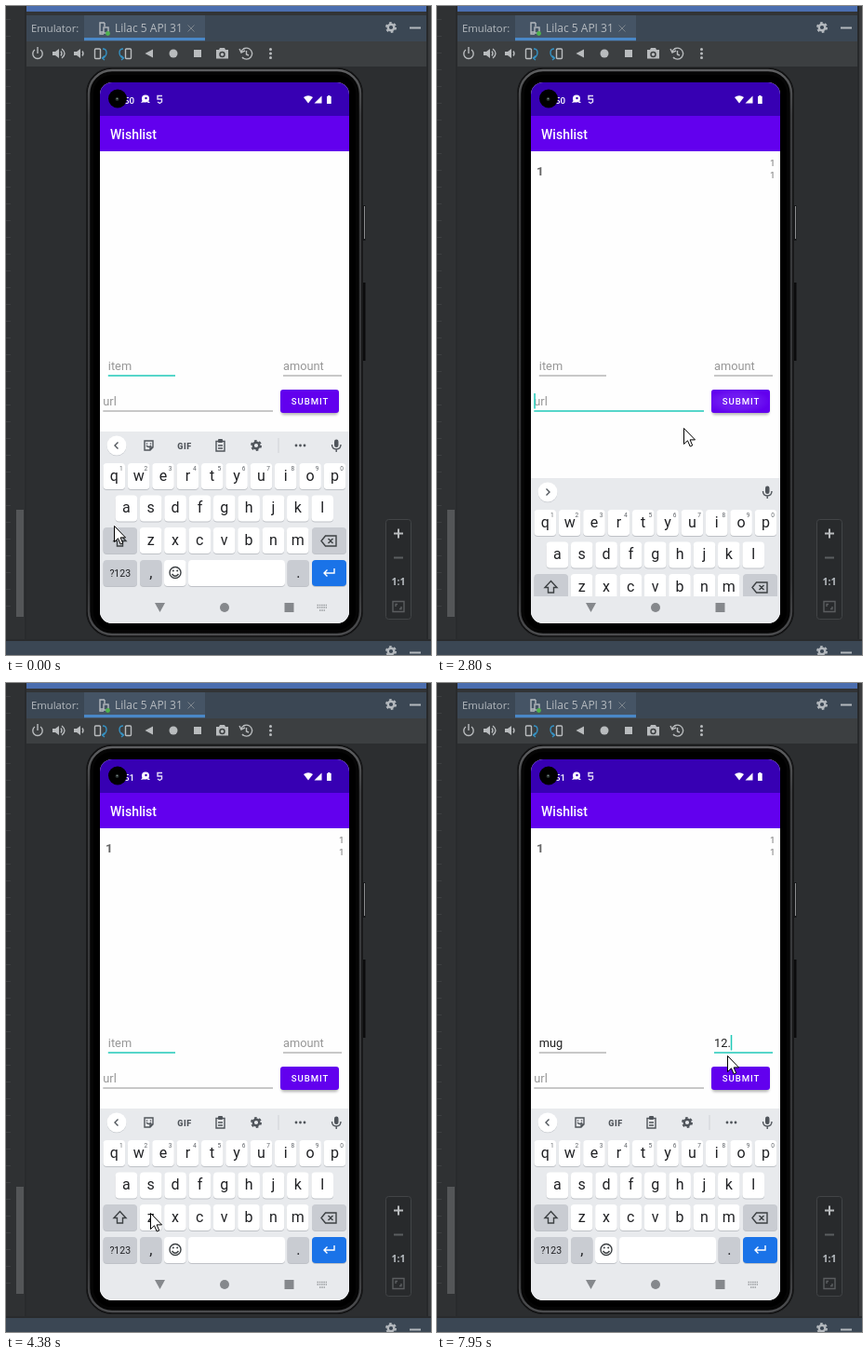
An HTML page for the animation above (8000 ms loop, 457x697 px).

```html
<!DOCTYPE html>
<html lang="en">
<head>
<meta charset="utf-8">
<title>Wishlist emulator</title>
<style>
html, body { margin: 0; width: 100%; height: 100%; overflow: hidden; background: #2f3133; }
svg { display: block; width: 457px; height: 697px; }
text { font-family: Roboto, sans-serif; white-space: pre; }
.ide { font-family: "Open Sans", sans-serif; fill: #b6bbc0; }
.mid { text-anchor: middle; }
.key { font-size: 16px; fill: #202124; }
.alt { font-size: 6.5px; fill: #5f6368; }
.field text { font-size: 12.8px; fill: #212121; }
.field .hint { fill: #979797; }
.line { fill: none; stroke: currentColor; stroke-width: 1.4; }
</style>
</head>
<body>
<svg viewBox="0 0 457 697">
  <defs>
    <clipPath id="screen"><rect x="101" y="82" width="268" height="581" rx="13"/></clipPath>
    <clipPath id="keyClip"><rect x="101" y="82" width="268" height="552"/></clipPath>
    <radialGradient id="glow" cx=".45" cy=".5" r=".55">
      <stop offset="0" stop-color="#8f4cf8"/><stop offset=".6" stop-color="#803bf5"/>
      <stop offset="1" stop-color="#6200ee"/>
    </radialGradient>
    <linearGradient id="rim" x2="0" y2="1">
      <stop offset="0" stop-color="#5d5e60"/><stop offset=".08" stop-color="#3b3c3e"/>
      <stop offset=".9" stop-color="#323335"/><stop offset="1" stop-color="#4b4c4e"/>
    </linearGradient>
    <filter id="soft" x="-20%" y="-40%" width="140%" height="200%"><feGaussianBlur stdDeviation="1.4"/></filter>
    <g id="gear" fill="none" stroke="currentColor">
      <circle r="3.3" stroke-width="2.4"/>
      <circle r="5" stroke-width="2" stroke-dasharray="2.6 2.636"/>
    </g>
    <g id="speaker">
      <path d="M-6-2H-3L1-5V5L-3 2H-6Z" fill="currentColor"/>
      <path d="M3-2.5Q5 0 3 2.5" class="line"/>
    </g>
    <g id="turn">
      <rect x="-6.5" y="-5" width="6" height="10.5" rx="1" class="line"/>
      <path d="M2-5Q6-5 6-1T2 5M4 2.5L1.5 5L4 7" class="line" style="color:#3592c4"/>
    </g>
  </defs>

  <!-- IDE window -->
  <rect width="457" height="697" fill="#2f3133"/>
  <path d="M2.5 14V655" stroke="#3d3f41" stroke-width="5" stroke-dasharray="1 17"/>
  <rect x="11" y="541" width="8" height="115" fill="#545658"/>
  <rect x="20" width="2" height="681" fill="#292b2d"/>
  <rect x="22" width="431" height="6" fill="#4b6eaf"/>
  <rect x="22" y="6" width="431" height="4" fill="#323436"/>
  <rect x="22" y="10" width="431" height="28" fill="#3b4754"/>
  <rect x="84" y="10" width="130" height="28" fill="#455465"/>
  <rect x="84" y="34" width="130" height="3" fill="#4a88c7"/>
  <rect x="22" y="38" width="431" height="27" fill="#3c3f41"/>
  <rect x="22" y="65" width="431" height="616" fill="#2c2e30"/>
  <rect x="453" width="4" height="681" fill="#393b3d"/>
  <rect x="452" width="2" height="681" fill="#27292b"/>
  <rect y="681" width="457" height="16" fill="#3b4754"/>
  <rect y="680" width="457" height="2" fill="#292b2d"/>
  <text class="ide" x="27" y="28" font-size="11.3">Emulator:</text>
  <text class="ide" x="117" y="28" font-size="12">Lilac 5 API 31</text>
  <g color="#b4b9be">
    <path d="M106 18H101V30H105M101 28H105M106 18V22" class="line"/>
    <rect x="105" y="23" width="5" height="6" class="line"/>
    <circle cx="109.5" cy="29.5" r="2.4" fill="#4fb34d"/>
    <path d="M195.500 20.500L202.500 27.500M202.500 20.500L195.500 27.500" stroke="#7d858d"/>
    <use href="#gear" x="414" y="23"/><use href="#gear" x="414" y="693"/>
    <path d="M434 23.500H446M434 694.500H446" stroke="currentColor" stroke-width="2"/>
  </g>
  <g transform="translate(0 51)" color="#b9bcbe" fill="#b9bcbe">
    <path d="M31-4A5.200 5.200 0 1 0 37-4M34-7V0" class="line" stroke-width="2"/>
    <use href="#speaker" x="56"/><path d="M60-5Q66 0 60 5" class="line"/>
    <use href="#speaker" x="79"/>
    <use href="#turn" x="102"/><use href="#turn" transform="translate(128) scale(-1 1)"/>
    <path d="M149.500 0L158-4.500V4.500Z"/><circle cx="180" r="4.500"/>
    <rect x="202" y="-4" width="8" height="8"/>
    <path d="M226-4H229L230-6H235L236-4H239V5.500H226Z"/><circle cx="232.500" cy="1" r="2.500" fill="#b9bcbe" stroke="#3c3f41" stroke-width="1.500"/>
    <path d="M253-2A6 6 0 1 1 254 4M251-5L253-1L257-3M258.500-3V1L261 2" class="line"/>
    <circle cx="284.500" cy="-4.500" r="1.500"/><circle cx="284.500" r="1.500"/><circle cx="284.500" cy="4.500" r="1.500"/>
  </g>
  <rect x="408.500" y="551.500" width="27" height="107" rx="3" fill="#282a2c" stroke="#424547"/>
  <path d="M417 566.500H427M422 561.500V571.500" stroke="#b9bcbe" stroke-width="2"/>
  <path d="M417 592.500H427" stroke="#5b5e60" stroke-width="2"/>
  <text class="ide mid" x="422" y="622" font-size="10.500" font-weight="700">1:1</text>
  <path d="M416 639.500H428V650.500H416ZM419 645V642.500H421M425 645V647.500H423" class="line" color="#5b5e60"/>

  <!-- phone -->
  <path d="M385 214V252" stroke="#17181a" stroke-width="3"/><path d="M385.500 215V250" stroke="#8d8e90"/>
  <path d="M385 297V381" stroke="#0b0b0c" stroke-width="3"/>
  <rect x="86.500" y="66.500" width="297" height="611" rx="27" fill="#0c0c0d" stroke="#1a1b1c"/>
  <rect x="89" y="69" width="292" height="606" rx="25" fill="#050505" stroke="url(#rim)" stroke-width="2.500"/>
  <rect x="94" y="74" width="282" height="596" rx="20" fill="#000"/>

  <g clip-path="url(#screen)">
    <rect x="101" y="82" width="268" height="581" fill="#fefefe"/>
    <rect x="101" y="82" width="268" height="36" fill="#3700b3"/>
    <rect x="101" y="118" width="268" height="38" fill="#6200ee"/>
    <text x="112" y="143" font-size="14" font-weight="500" fill="#fff">Wishlist</text>
    <text id="clock" x="127" y="104.500" font-size="9.800" font-weight="500" fill="#fff"></text>
    <circle cx="120" cy="99.500" r="10" fill="#000"/>
    <circle cx="119.500" cy="100" r="2" fill="#28302f"/><circle cx="119.500" cy="99.500" r=".8" fill="#879391"/>
    <g fill="#fff">
      <circle cx="150" cy="99.500" r="4"/><path d="M145 104L148 100L150 103ZM153 102L155 104H152Z"/>
      <circle cx="150.500" cy="99" r="1.200" fill="#3700b3"/>
      <path d="M168 96.500H163V100H167.500V103L165.300 104.500L163 103" class="line" color="#e4dcf7"/>
      <path d="M320 98Q325 94.500 330 98L325 104.500Z"/><path d="M331.500 104.500H339.500V96.500Z"/>
      <path d="M345 97H346V96H348.500V97H349.700V105H345Z"/>
    </g>
    <g id="list" fill="#757575">
      <text x="107" y="182" font-size="13.500" font-weight="700" fill="#666">1</text>
      <text x="358" y="172" font-size="9.800">1</text>
      <text x="358" y="185" font-size="9.800">1</text>
    </g>

    <g id="form">
      <rect x="296" y="414" width="61" height="25" rx="3" fill="#000" opacity=".3" filter="url(#soft)"/>
      <rect x="295" y="412" width="63" height="25" rx="3" fill="#6200ee"/>
      <rect id="ripple" x="295" y="412" width="63" height="25" rx="3" fill="url(#glow)"/>
      <text class="mid" x="327" y="428" font-size="9.600" font-weight="500" letter-spacing=".9" fill="#fff">SUBMIT</text>
    </g>

    <rect id="navBack" x="101" y="630" width="268" height="33"/>
    <g clip-path="url(#keyClip)"><g id="keyboard">
      <rect x="101" y="457" width="268" height="210" fill="#e8eaed"/>
      <g id="strip" transform="translate(0 472)" color="#50555b" fill="#50555b">
        <circle cx="119" cy=".8" r="10.500" fill="#c9ccd1"/><circle cx="119" r="10.500" fill="#fff"/>
        <path id="chevron" class="line" stroke-width="1.600"/>
        <rect x="353" y="-6.500" width="4.500" height="8.500" rx="2.200"/>
        <path d="M350.500-1Q350.500 4 355.200 4T360-1M355.200 4V7" class="line"/>
        <g id="tools">
          <path d="M149-5H158V2L155 5H149ZM158 2H155V5" class="line"/>
          <path d="M151 0Q153.500 3 156 0" class="line"/><circle cx="151.500" cy="-2" r=".8"/><circle cx="155.500" cy="-2" r=".8"/>
          <text class="mid" x="192" y="3.500" font-size="9" font-weight="900" letter-spacing=".5">GIF</text>
          <path d="M226-4.500H235V6H226ZM228 0H233M228 3H233" class="line"/><rect x="228" y="-7" width="5" height="4" rx="1"/>
          <use href="#gear" x="269"/>
          <path d="M293-8V8" stroke="#cfd2d6"/>
          <circle cx="312" r="1.400"/><circle cx="316.500" r="1.400"/><circle cx="321" r="1.400"/>
        </g>
        <g id="words" class="mid" font-size="12.500">
          <text x="161" y="4.500">m</text><text x="234" y="4.500">my</text><text x="307.500" y="4.500">me</text>
          <path d="M196.500-8V8M273.500-8V8" stroke="#cfd2d6"/>
        </g>
      </g>
      <g id="keys"></g>
      <g color="#3c4043">
        <path d="M122.500 567.500L129 574.500H125.500V580H119.500V574.500H116Z" class="line"/>
        <path d="M339 574.500L343.500 569H355V580H343.500ZM346.500 572L351.500 577M351.500 572L346.500 577" class="line"/>
        <circle cx="182" cy="608.500" r="6" class="line"/><path d="M178.500 610Q182 614.500 185.500 610" class="line"/>
        <circle cx="179.800" cy="606.500" r="1" fill="currentColor"/><circle cx="184.200" cy="606.500" r="1" fill="currentColor"/>
        <path d="M353 604V609H342M345.500 605.500L342 609L345.500 612.500" class="line" color="#fff"/>
      </g>
    </g></g>
    <g id="nav">
      <path id="back"/><circle cx="235" cy="646" r="5"/><rect x="299.500" y="641" width="10" height="10"/>
      <path id="kbIcon" d="M334.500 643.500H345M334.500 646H345M337 649H343" fill="none" stroke="#9a9da1" stroke-width="1.500" stroke-dasharray="1.500 .8"/>
    </g>
  </g>
  <path id="mouse" d="M0 0V17L4 13.300L6.700 19.500L9.200 18.400L6.600 12.400H12Z" fill="#fff" stroke="#000"/>
</svg>

<script>
const $ = id => document.getElementById(id);
const LOOP = 8000, STEP = 132.7;

function add(parent, tag, attrs, text) {
  const el = document.createElementNS('http://www.w3.org/2000/svg', tag);
  for (const name in attrs) el.setAttribute(name, attrs[name]);
  if (text) el.textContent = text;
  return parent.appendChild(el);
}
const show = (el, on) => { el.style.display = on ? '' : 'none'; };

// keyboard
function key(x, y, w, fill = '#fff', label, cls = 'key mid', dy = 18.5) {
  add($('keys'), 'rect', { x, y: y + 1, width: w, height: 28, rx: 4, fill: '#bfc2c7' });
  add($('keys'), 'rect', { x, y, width: w, height: 28, rx: 4, fill });
  if (label) add($('keys'), 'text', { x: x + w / 2, y: y + dy, class: cls }, label);
}
[['qwertyuiop', 116.3, 491], ['asdfghjkl', 129.4, 525.5], ['zxcvbnm', 155.6, 560]].forEach(([row, x0, y], r) => {
  [...row].forEach((c, i) => {
    const x = x0 + i * 26.35;
    key(x - 11.8, y, 23.6, '#fff', c);
    if (!r) add($('keys'), 'text', { x: x + 7.6, y: y + 8, class: 'alt mid' }, String((i + 1) % 10));
  });
});
const GREY = '#c9ccd2';
key(104.5, 560, 36.5, GREY);
key(329, 560, 37, GREY);
key(104.5, 595, 36.5, GREY, '?123', 'mid key small', 17.5);
document.querySelector('.small').style.fontSize = '10.5px';
key(144, 595, 23.5, GREY, ',');
key(170, 595, 23.6);
key(196, 595, 104);
key(302.5, 595, 23.5, GREY, '.');
key(329, 595, 37, '#1a73e8');

// text fields
const fields = [['item', 109.8, 182, 391], ['amount', 298, 361, 391], ['url', 104.3, 287, 429]].map(([name, x, x2, y]) => {
  const g = add($('form'), 'g', { class: 'field' });
  return {
    name, x,
    line: add(g, 'path', { d: `M${x} ${y + 6}H${x2}` }),
    hint: add(g, 'text', { x, y, class: 'hint' }, name),
    value: add(g, 'text', { x, y }),
    caret: add(g, 'rect', { y: y - 13, width: 1.5, height: 16.5, fill: '#1fc9b8' })
  };
});

// state changes by step
const changes = [
  [0, { item: '', amount: '', url: '', focus: 'item', caret: '', strip: 'tools', form: 0, slide: 0, open: 1, nav: 'down', list: 0, ripple: 0, clock: '50', compose: 0 }],
  [1, { caret: 'item' }],
  [2, { item: '1' }],
  [9, { focus: 'amount', caret: 'amount' }],
  [12, { amount: '1' }],
  [14, { focus: 'url', caret: 'url' }],
  [17, { url: '1', strip: 'bare' }],
  [19, { ripple: .5 }],
  [20, { ripple: 1 }],
  [21, { ripple: .4, list: 1, item: '', amount: '', url: '', slide: 50 }],
  [22, { ripple: 0, open: 0, form: 173, nav: 'left' }],
  [27, { focus: 'item url', caret: 'item url' }],
  [28, { focus: 'item', caret: 'item', open: 1, form: 0, slide: 90, strip: 'tools' }],
  [29, { slide: 8 }],
  [30, { slide: 0, nav: 'down' }],
  [33, { clock: '51', caret: '' }],
  [35, { item: 'm', compose: 1, caret: 'item' }],
  [38, { item: 'mug' }],
  [40, { strip: 'words' }],
  [49, { focus: 'amount', caret: 'amount', strip: 'tools', compose: 0 }],
  [55, { amount: '1' }],
  [57, { amount: '12' }],
  [60, { amount: '12.' }]
];
const path = [
  [0, 116, 558], [2, 116, 558], [7, 320, 361], [8, 318, 380], [9, 318, 380], [11, 303, 419],
  [13, 285, 431], [20, 285, 431], [24, 155, 569], [40, 155, 569], [47, 323, 357],
  [49, 323, 376], [51, 323, 376], [53, 326, 396], [55, 312, 400], [61, 312, 400]
];

function mouseAt(k) {
  const i = path.findIndex(p => p[0] > k);
  const [k0, x0, y0] = path[i - 1], [k1, x1, y1] = path[i];
  const u = (k - k0) / (k1 - k0), e = u * u * (3 - 2 * u);
  return [x0 + (x1 - x0) * e, y0 + (y1 - y0) * e];
}

function render(k) {
  const s = Object.assign({}, ...changes.filter(c => c[0] <= k).map(c => c[1]));
  for (const f of fields) {
    const focused = s.focus.includes(f.name), text = s[f.name];
    f.line.setAttribute('stroke', focused ? '#1fc9b8' : '#929292');
    f.line.setAttribute('stroke-width', focused ? 1.7 : 1);
    show(f.hint, !text);
    f.value.textContent = text;
    f.value.style.textDecoration = s.compose && f.name === 'item' ? 'underline' : '';
    f.caret.setAttribute('x', f.x + (text ? f.value.getComputedTextLength() : 0));
    show(f.caret, s.caret.includes(f.name));
  }
  $('form').setAttribute('transform', `translate(0 ${s.form})`);
  $('keyboard').setAttribute('transform', `translate(0 ${s.slide})`);
  show($('keyboard'), s.open);
  show($('list'), s.list);
  show($('tools'), s.strip === 'tools');
  show($('words'), s.strip === 'words');
  show($('kbIcon'), s.open && s.strip !== 'bare');
  $('ripple').setAttribute('opacity', s.ripple);
  $('clock').textContent = s.clock;
  $('chevron').setAttribute('d', s.strip === 'tools' ? 'M120.5-3.5L117 0L120.5 3.5' : 'M117.500-3.500L121 0L117.500 3.500');
  $('navBack').setAttribute('fill', s.open ? '#e8eaed' : '#000');
  $('nav').setAttribute('fill', s.open ? '#85888c' : '#c6c6c6');
  $('back').setAttribute('d', s.nav === 'down' ? 'M160 641H171L165.500 651Z' : 'M160 646L169.500 640.500V651.500Z');
  $('mouse').setAttribute('transform', `translate(${mouseAt(k).map(v => Math.round(v) + .5)})`);
}

let last = -1;
function tick() {
  const k = Math.floor((performance.now() % LOOP + 14) / STEP);
  if (k !== last) render(last = k);
  requestAnimationFrame(tick);
}
tick();
</script>
</body>
</html>
```
